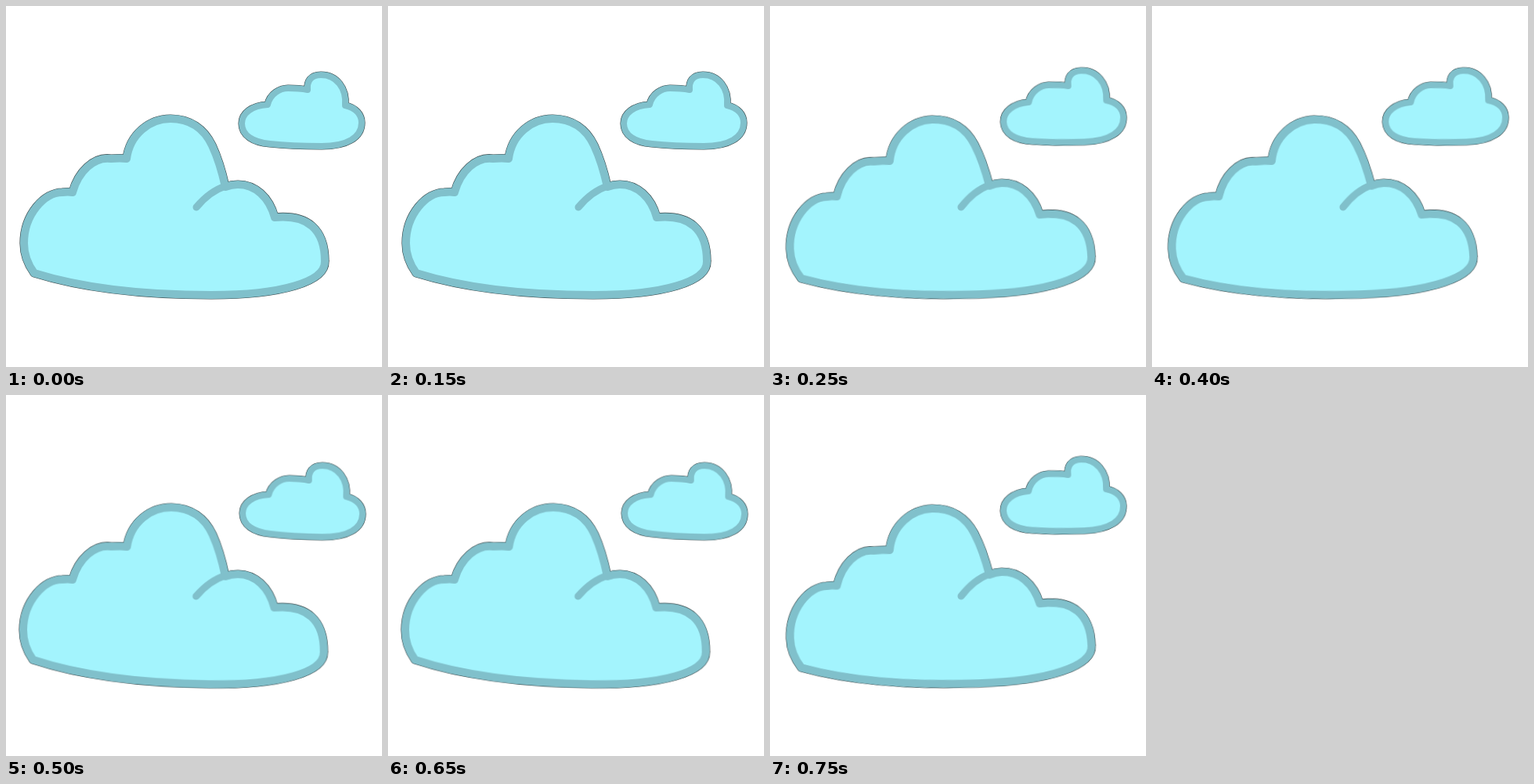
Recreate the animation shown at these times as an HTML page. Size 480x461 px, loop 1 s.

```html
<!DOCTYPE html>
<html lang="en">
<head>
<meta charset="utf-8">
<title>Swaying clouds</title>
<style>
  html, body { margin: 0; width: 100%; height: 100%; overflow: hidden; background: #fff; }
  svg { display: block; width: 100vw; height: 100vh; }
  #sky { transform-origin: 240px 230px; }
  path { stroke-linejoin: round; stroke-linecap: round; }
  .edge { fill: none; stroke: #38484b; }
  .body { fill: #a3f4fd; stroke: #80c0cb; }
  .fold { fill: none; stroke: #80c0cb; }
  #big .edge { stroke-width: 11.2; }
  #big .body { stroke-width: 10; }
  #big .fold { stroke-width: 9; }
  #small .edge { stroke-width: 9.2; }
  #small .body { stroke-width: 8; }
</style>
</head>
<body>
<svg viewBox="0 0 480 461">
  <defs>
    <path id="bigShape" d="M36 341 C28 330 23 317 23 303 C23 266 49 238 72 238 Q79 237 85 238
      C92 212 112 192 134 195 Q146 194 154 195 C158 164 183 144 210 144
      C235 144 253 157 263 178 C270 193 275 208 280 231 Q288 228 296 228
      C318 228 336 244 343 270 C385 266 407 285 407 326
      C408 352 352 369 262 369 C180 369 100 361 36 341 Z"/>
    <path id="smallShape" d="M301 150 C301 137 314 127 334 126 C337 112 350 105 360 105
      Q374 105 385 107 C384 96 389 88 402 88 C422 88 435 105 433 127
      C447 130 454 139 454 149 C454 168 435 179 403 179
      C380 179 355 178 337 176 C315 174 301 165 301 150 Z"/>
  </defs>
  <g id="sky">
    <g id="big">
      <use class="edge" href="#bigShape"/>
      <use class="body" href="#bigShape"/>
      <path class="fold" d="M243 257 C253 245 265 235 280 230"/>
    </g>
    <g id="small">
      <use class="edge" href="#smallShape"/>
      <use class="body" href="#smallShape"/>
    </g>
  </g>
</svg>
<script>
  // Tilt of the whole sky in degrees, held for a quarter second each.
  const tilts = [0, -1.95, 0.8, -2.05];
  const steps = [...tilts, tilts[0]].map((deg, i) => ({
    transform: `rotate(${deg}deg)`,
    offset: i / tilts.length,
    easing: 'step-end'
  }));
  document.getElementById('sky').animate(steps, { duration: 1000, iterations: Infinity });
</script>
</body>
</html>
```
